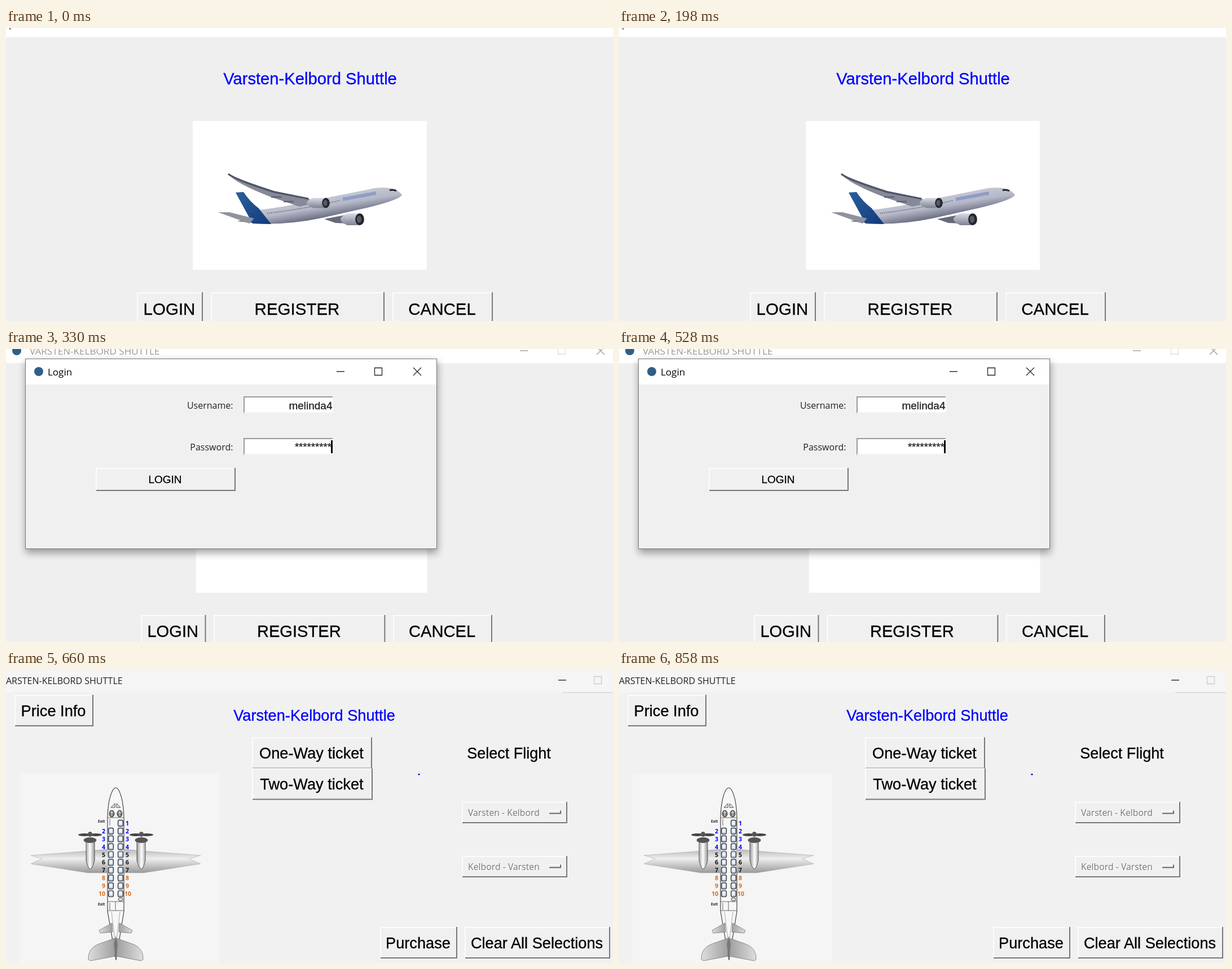
Write an HTML page that moves like this. It is 1076 px wide and 520 px high and loops after 0.99 s.

```html
<!DOCTYPE html>
<html lang="en">
<head>
<meta charset="utf-8">
<title>Shuttle booking</title>
<style>
html, body { margin: 0; width: 100%; height: 100%; overflow: hidden; background: #efefef; }
svg { display: block; width: 1076px; height: 520px; }
text { font-family: "Liberation Sans", Arial, sans-serif; white-space: pre; stroke: currentColor; stroke-width: .3; }
.ui { font-family: "Open Sans", "Noto Sans", sans-serif; stroke: none; }
.mid { text-anchor: middle; }
.end { text-anchor: end; }
.bold { font-weight: 700; }
.scene { visibility: hidden; animation: show 990ms step-end infinite; }
#login { animation-delay: -660ms; }
#seats { animation-delay: -330ms; }
@keyframes show {
  0% { visibility: visible; }
  33.3333%, 100% { visibility: hidden; }
}
</style>
</head>
<body>
<svg viewBox="0 0 1076 520">
  <defs>
    <linearGradient id="hull" gradientUnits="userSpaceOnUse" x1="567" y1="300" x2="573" y2="336">
      <stop offset="0" stop-color="#c3c6d3"/><stop offset=".45" stop-color="#b5b8c7"/><stop offset="1" stop-color="#666b7f"/>
    </linearGradient>
    <linearGradient id="fin" x2="1" y2="1">
      <stop offset="0" stop-color="#2c5f9c"/><stop offset="1" stop-color="#123a7c"/>
    </linearGradient>
    <linearGradient id="pod" x2="0" y2="1">
      <stop offset="0" stop-color="#d9dbe4"/><stop offset="1" stop-color="#7d8192"/>
    </linearGradient>
    <linearGradient id="wing" x2="0" y2="1">
      <stop offset="0" stop-color="#b8b8b8"/><stop offset=".4" stop-color="#eee"/><stop offset="1" stop-color="#999"/>
    </linearGradient>
    <linearGradient id="nacelle">
      <stop offset="0" stop-color="#aaa"/><stop offset=".45" stop-color="#fff"/><stop offset="1" stop-color="#999"/>
    </linearGradient>
    <linearGradient id="tail">
      <stop offset="0" stop-color="#ddd"/><stop offset="1" stop-color="#a0a0a0"/>
    </linearGradient>
    <filter id="shade" x="-10%" y="-10%" width="120%" height="125%"><feGaussianBlur stdDeviation="7"/></filter>
  </defs>
  <g id="home" class="scene"></g>
  <g id="login" class="scene"></g>
  <g id="seats" class="scene"></g>
</svg>
<script>
const A = 'Varsten', B = 'Kelbord', title = `${A}-${B} Shuttle`;
const dark = '#222';

const rect = (x, y, w, h, fill, more = '') =>
  `<rect x="${x}" y="${y}" width="${w}" height="${h}" fill="${fill}" ${more}/>`;
const path = (d, fill, stroke = 'none', w = 1, more = '') =>
  `<path d="${d}" fill="${fill}" stroke="${stroke}" stroke-width="${w}" ${more}/>`;
const line = (d, color, w = 1, more = '') => path(d, 'none', color, w, more);
const oval = (x, y, rx, ry, fill, more = '') =>
  `<ellipse cx="${x}" cy="${y}" rx="${rx}" ry="${ry}" fill="${fill}" ${more}/>`;
const text = (x, y, size, str, cls = '', fill = '#000') =>
  `<text x="${x}" y="${y}" font-size="${size}" class="${cls}" fill="${fill}" color="${fill}">${str}</text>`;

// Box with a lit top left edge and a shaded bottom right edge
const box = (x, y, w, h, fill, lit, shaded) => rect(x, y, w, h, fill) +
  line(`M${x + 1} ${y + h}V${y + 1}H${x + w}`, lit, 2) +
  line(`M${x + 1} ${y + h - 1}H${x + w - 1}V${y}`, shaded, 2);
const panel = (x, y, w, h) => box(x, y, w, h, '#f0f0f0', '#fcfcfc', '#777');
const field = (x, y) => box(x, y, 160, 30, '#fff', '#9a9a9a', '#f4f4f4');
const button = (x, y, w, h, size, str) =>
  panel(x, y, w, h) + text(x + w / 2 - 1, y + h / 2 + size * .36, size, str, 'mid');

const minimize = (x, y, c) => line(`M${x} ${y}h14`, c, 1.4);
const maximize = (x, y, c) => line(`M${x} ${y}h13v13h-13z`, c, 1.3);
const close = (x, y, c) => line(`M${x} ${y}l14 14m0 -14l-14 14`, c, 1.3);
const icon = (x, y) => oval(x, y, 8, 8, '#2f5f87');

const jet = (x, y, r) => path(`M${x} ${y - r}h-22q-24 ${r} 0 ${2 * r}h22z`, 'url(#pod)') +
  oval(x, y, r * .75, r, '#24262e') + oval(x - 1, y, r * .4, r * .6, '#555a68');

function airliner() {
  return path('M564 339L606 331 608 347 584 346z', '#666a78') +
    path('M410 343L436 337 446 347z', '#6f7280') +
    path('M440 324Q500 317 545 306L655 284Q690 280 702 296 698 305 640 319L560 337Q500 350 440 347z', 'url(#hull)') +
    path('M407 292L421 291Q432 308 448 320L470 348 437 347z', 'url(#fin)') +
    path('M376 327L396 327 440 338 431 347z', '#8f929f') +
    path('M393 258Q405 266 475 289L536 302 547 311 520 317 470 300Q405 275 393 258z', '#858998') +
    line('M394 259Q408 270 475 291L536 303', '#4f5466', 3) +
    line('M470 300h18M492 308h18', '#5d6172', 2.5) +
    line('M463 329Q535 320 592 306', '#59607a', 1.6, 'stroke-dasharray="1.6 1.7"') +
    line('M597 304L656 293', '#8f9dc6', 6) +
    line('M680 288Q686 286 692 289', '#23252e', 3) +
    jet(567, 310.5, 9) + jet(627, 339.5, 10.5);
}

function home() {
  const row = (x, w, str) => button(x, 469, w, 58, 29.5, str);
  return rect(0, 0, 1076, 530, '#efefef') + rect(0, 0, 1076, 16, '#fff') +
    rect(6.5, 0, 1.5, 3, '#444') +
    text(539, 100, 29.2, title, 'mid', '#00f') +
    rect(331, 165, 415, 264, '#fff') + airliner() +
    row(232, 117, 'LOGIN') + row(363, 308, 'REGISTER') + row(685, 178, 'CANCEL');
}

function login() {
  const gray = '#999';
  const input = (y, label) => text(402.5, y + 22, 16, label, 'ui end', dark) + field(421, y);
  return rect(0, 0, 1076, 520, '#efefef') +
    `<g transform="translate(9.9 9) scale(.9873)">${home()}</g>` +
    rect(0, 0, 1076, 25, '#fff') + icon(19, 3) +
    text(42, 10, 17.1, title.toUpperCase(), 'ui', gray) +
    minimize(911, 3, gray) + maximize(978.5, -4, '#ddd') + close(1047, -4, gray) +
    rect(35, 22, 730, 340, '#000', 'opacity=".36" filter="url(#shade)"') +
    rect(34.5, 17.5, 729, 337, '#f0f0f0', 'stroke="#777"') + rect(35, 18, 728, 45, '#fff') +
    icon(58, 40) + text(74, 47, 17, 'Login', 'ui') +
    minimize(586, 40, dark) + maximize(653.5, 33.5, dark) + close(722, 33, dark) +
    input(84, 'Username:') + text(578.5, 107, 19, 'melinda4', 'end', dark) +
    input(158, 'Password:') + text(577, 180, 18.6, '*'.repeat(9), 'end', dark) +
    rect(576, 162, 3, 23, '#000') +
    button(159, 211, 248, 41, 19, 'LOGIN');
}

// Left half of the symmetric parts
function half() {
  return path('M181 318L135 322 44 329 64 335 44 344 145 360H181z', 'url(#wing)', '#aaa', .6) +
    path('M142 303Q149 295 157 303V338Q149 368 142 338z', 'url(#nacelle)', '#555') +
    oval(149, 302, 11.5, 5, '#555') +
    oval(139, 292.5, 11, 2.5, '#444') + oval(159, 292.5, 11, 2.5, '#444') + oval(149, 291.5, 4, 4.5, '#555') +
    path('M188 449L165 462 167 467 189 465z', 'url(#tail)', '#777', .8) +
    path('M193 476L168 485Q145 492 146 514L150 516 193 508z', 'url(#tail)', '#777', .8) +
    path('M186 244L193 237V244z', '#eee', '#444') +
    oval(187.5, 255, 4.5, 6, '#777', 'stroke="#333"') + line('M184.5 253h6m-3 -3v9', '#eee') +
    line('M187 429L193 478', '#aaa');
}

const seat = (x, y) => rect(x - 4.5, y - 5.5, 9, 11, '#b9c7dc', 'rx="2.5" stroke="#333" stroke-width="1.2"') +
  rect(x - 2.5, y - 4, 5, 6.5, '#eef3fa', 'rx="1"');

function seatMap() {
  let s = rect(24, 184, 353, 336, '#f5f5f5') +
    path('M180 262Q181 227 190 212 194.500 206 199 212 208 227 209 262V428L195 515 180 428z', '#f7f7f7', '#444', 1.2) +
    half() + `<g transform="translate(389 0) scale(-1 1)">${half()}</g>` +
    line('M181 262H208M180 411H209M180 427H209M194 411V427M184 264V276M184 413V426', '#555', .9) +
    path('M194.500 472L198 486 195 515 191 486z', '#777');
  for (let i = 1; i <= 10; i++) {
    const y = 258 + i * 13.9;
    const color = i < 5 ? '#00f' : i < 8 ? '#111' : '#dc6a1c';
    if (i > 1) s += seat(186, y) + text(176, y + 4, 10.5, i, 'ui bold end', color);
    s += seat(203, y) + text(i > 9 ? 210 : 212, y + 4, 10.5, i, 'ui bold', color);
  }
  for (const y of [271, 418]) s += text(163, y, 6.5, 'Exit', 'ui bold', dark);
  return s + oval(203, 407, 4, 3, '#ddd', 'stroke="#444"');
}

const menu = (y, str) => panel(808, y, 187, 38) +
  text(820, y + 26, 15.8, str, 'ui', '#fff') + text(819, y + 25, 15.8, str, 'ui', '#777') +
  line(`M963 ${y + 20.5}v-5h20`, '#fff') + line(`M963 ${y + 20.5}h20v-5`, '#666', 2);

function seats() {
  const key = (x, y, w, str) => button(x, y, w, 56, 27.2, str);
  return rect(0, 0, 1076, 520, '#f1f1f1') + rect(0, 0, 1076, 40, '#f5f5f5') +
    text(-9, 24.5, 16, title.toUpperCase(), 'ui', dark) +
    minimize(979, 18, dark) + maximize(1042.5, 11.5, '#ccc') +
    rect(986, 39.5, 90, 1, '#c8c8c8') +
    text(546.5, 89.5, 27.2, title, 'mid', '#00f') +
    text(891.5, 157, 27, 'Select Flight', 'mid') +
    rect(730.5, 184, 3, 2.5, '#00f') +
    key(15, 44, 140, 'Price Info') +
    key(436, 119.5, 213, 'One-Way ticket') + key(436, 174.5, 214, 'Two-Way ticket') +
    key(663, 456, 137, 'Purchase') + key(813, 456, 258, 'Clear All Selections') +
    menu(234, `${A} - ${B}`) + menu(330, `${B} - ${A}`) +
    seatMap();
}

for (const draw of [home, login, seats])
  document.getElementById(draw.name).innerHTML = draw();
</script>
</body>
</html>
```
